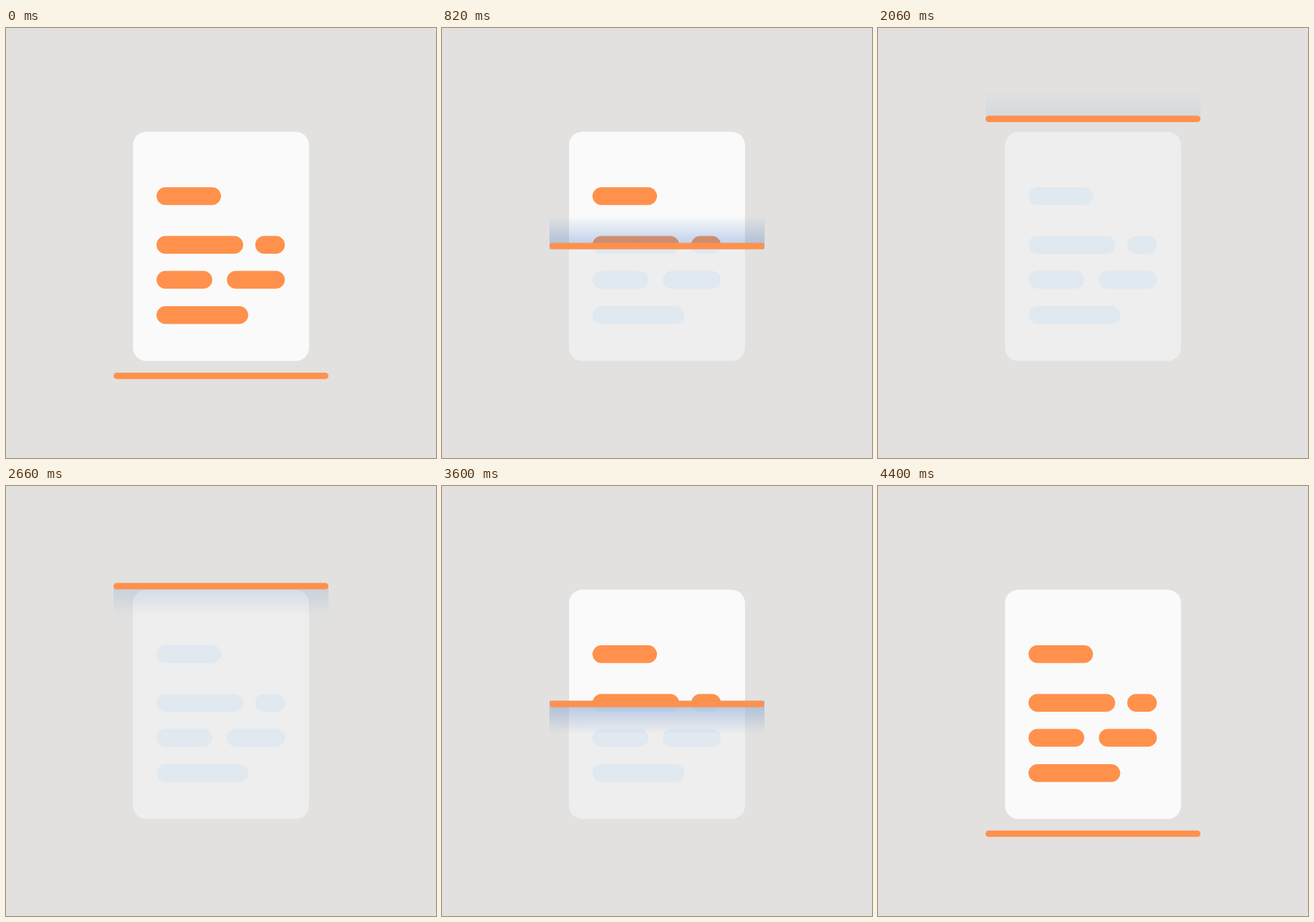
Write an HTML page that moves like this. It is 640 px wide and 640 px high and loops after 4.54 s.

```html
<!DOCTYPE html>
<html lang="en">
<head>
<meta charset="utf-8">
<title>Document scan</title>
<style>
  html, body { margin: 0; width: 100%; height: 100%; overflow: hidden; background: #e2e1df; }
  svg { display: block; width: 100vw; height: 100vh; }
</style>
</head>
<body>
<svg viewBox="0 0 640 640">
  <defs>
    <linearGradient id="glow" x1="0" y1="0" x2="0" y2="1">
      <stop offset="0" stop-color="#5485cd" stop-opacity="0"/>
      <stop offset="1" stop-color="#5485cd" stop-opacity=".42"/>
    </linearGradient>
    <clipPath id="above"><rect id="cut" width="640" height="640"/></clipPath>
    <rect id="card" x="189" y="154.5" width="262" height="341" rx="20"/>
    <g id="lines">
      <rect x="224" y="237" width="96" height="26.5" rx="13.25"/>
      <rect x="224" y="309.5" width="129" height="26.5" rx="13.25"/>
      <rect x="371" y="309.5" width="44" height="26.5" rx="13.25"/>
      <rect x="224" y="361.5" width="83" height="26.5" rx="13.25"/>
      <rect x="328.7" y="361.5" width="86.3" height="26.5" rx="13.25"/>
      <rect x="224" y="414" width="136.5" height="26.5" rx="13.25"/>
    </g>
  </defs>
  <rect width="640" height="640" fill="#e2e1df"/>
  <use href="#card" fill="#eeeeee"/>
  <use href="#lines" fill="#e0e8f0"/>
  <g clip-path="url(#above)">
    <use href="#card" fill="#fafafa"/>
    <use href="#lines" fill="#ff914d"/>
  </g>
  <g id="beam"><rect id="light" x="160" width="320" fill="url(#glow)"/></g>
  <rect id="bar" x="160" width="320" height="9.5" rx="4.75" fill="#ff914d"/>
</svg>
<script>
  const LOOP = 4540, HALF = 2210, STEP = 20;
  const LOW = 513, HIGH = 129, BAR = 9.5, REACH = 40;
  const [cut, beam, light, bar] = ['cut', 'beam', 'light', 'bar'].map(id => document.getElementById(id));

  const clamp = v => Math.max(0, Math.min(1, v));

  // Cubic bezier easing (.275, 0, .376, 1), solved by bisection.
  function ease(x) {
    let lo = 0, hi = 1, s = x;
    for (let i = 0; i < 30; i++) {
      s = (lo + hi) / 2;
      const e = 1 - s;
      if (3 * .275 * s * e * e + 3 * .376 * s * s * e + s * s * s < x) lo = s; else hi = s;
    }
    return s * s * (3 - 2 * s);
  }

  function draw(t) {
    const rising = t < HALF;
    const p = rising ? t / HALF : clamp((t - HALF) / HALF);
    const lift = t === 0 ? 0 : ease(rising ? p : 1 - p);
    const y = LOW + (HIGH - LOW) * lift;
    const tuck = Math.min(BAR + .2, 5 + (1 - lift) * 10);
    const fade = rising ? Math.min(p / .35, (1 - p) / .3) : Math.min(p / .45, (1 - p) / .35);

    bar.setAttribute('y', y);
    cut.setAttribute('height', y + BAR / 2);
    light.setAttribute('y', -REACH);
    light.setAttribute('height', REACH + tuck);
    // The light leads the bar, so it is mirrored on the way down.
    beam.setAttribute('transform', rising ? `translate(0 ${y})` : `translate(0 ${y + BAR}) scale(1 -1)`);
    beam.setAttribute('opacity', clamp(fade));
  }

  let start;
  function tick(now) {
    if (start === undefined) start = now;
    draw(Math.floor((now - start) % LOOP / STEP) * STEP);
    requestAnimationFrame(tick);
  }
  draw(0);
  requestAnimationFrame(tick);
</script>
</body>
</html>
```
